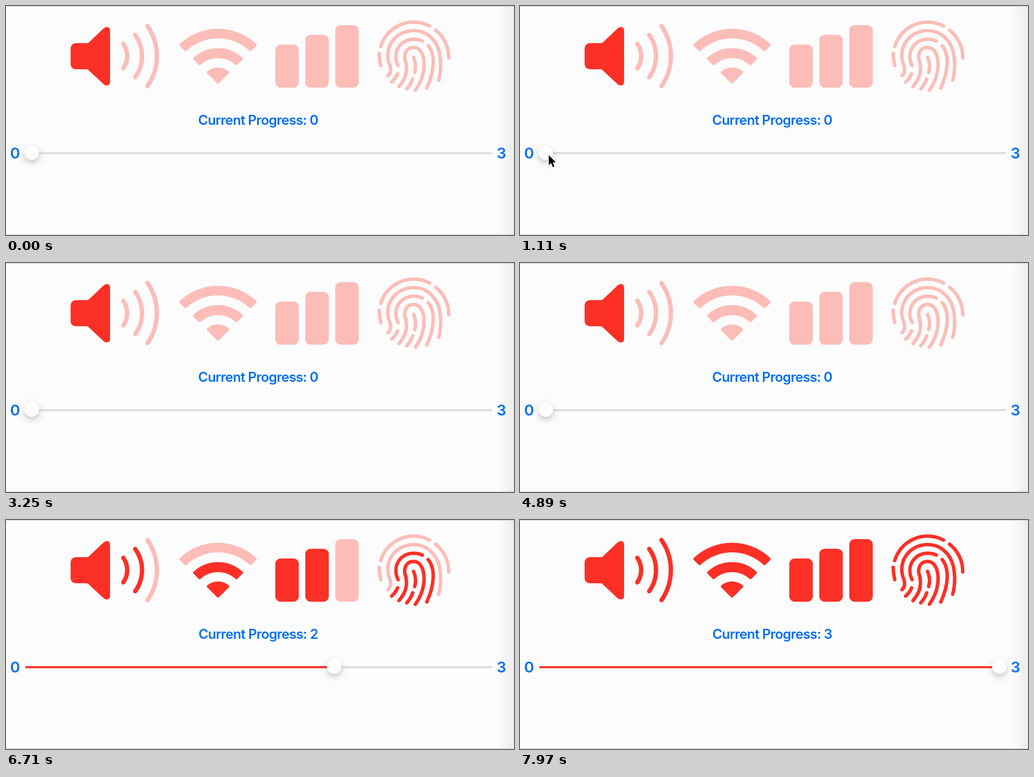
An HTML page with a canvas that plays this animation: 1113x503 px, repeating every 7.99 s.

```html
<!DOCTYPE html>
<html lang="en">
<head>
<meta charset="utf-8">
<title>Variable symbols</title>
<style>
  html, body { margin: 0; width: 100%; height: 100%; overflow: hidden; background: #fcfcfc; }
  canvas { display: block; }
</style>
</head>
<body>
<canvas id="stage" width="1113" height="503"></canvas>
<script>
const ctx = document.getElementById('stage').getContext('2d');
const W = 1113, H = 503, LOOP = 7990;
const RED = '#fd3026', PINK = '#fcbdb8', BLUE = '#016ff5';
const STEPS = [4910, 6010, 6790];
const CURSOR = { from: 850, to: 1900 };

const speaker = new Path2D(`M155 81.5H177Q180 81.5 182 79.5L213 50C219 44 228 45 228 54
  V167C228 175 219 177 213 171L182 142Q180 139 177 139H155Q141.5 139 141.5 126V95Q141.5 81.5 155 81.5Z`);

const waves = [
  'M257 83A47 47 0 0 1 257 137',
  'M283 63.5A79.6 79.6 0 0 1 283 156.5',
  'M310 44A116.5 116.5 0 0 1 310 176'
].map(d => new Path2D(d));

// Ridges grouped from the core outwards
const ridges = [
  `M861 177C876 159 880 145 876 124C869 107 877 91 893 91C910 91 916 112 916 128C916 150 909 168 897 185
   M893 113Q900 129 895.5 146M891 160Q887 172 878 182`,
  `M859 131C845 101 864 73 893 73Q904 73 912 77M925 87C942 108 938 145 922 180M845 167Q854 159 858 149`,
  `M821 89A75 75 0 0 1 928 44M941 53A76 76 0 0 1 970 114M817.5 104Q818 118 821 131
   M837 153C846 145 842 132 839 125C828 88 855 54 893 54C924 54 943 77 949 100C954 122 953 146 948 163`
].map(d => new Path2D(d));

const arrow = new Path2D('M0 0V22L5 17.5L9 26.5L12.5 25L8.8 16H15.5Z');

// Wi-Fi band between two radii, with softened corners
function band(inner, outer) {
  const x = 464.5, y = 171.5, soft = 3, up = -Math.PI / 2, half = Math.PI / 4;
  const p = new Path2D();
  const ro = outer - soft, ao = half - Math.asin(soft / ro);
  p.arc(x, y, ro, up - ao, up + ao);
  if (inner) {
    const ri = inner + soft, ai = half - Math.asin(soft / ri);
    p.arc(x, y, ri, up + ai, up - ai, true);
  } else {
    p.lineTo(x, y - soft * Math.SQRT2);
  }
  p.closePath();
  return p;
}
const bands = [band(0, 36.5), band(57, 79), band(100.5, 121.5)];

function stroke(path, color, width) {
  ctx.strokeStyle = color;
  ctx.lineWidth = width;
  ctx.stroke(path);
}

function pill(x, y, w, h, r, color) {
  ctx.fillStyle = color;
  ctx.beginPath();
  ctx.roundRect(x, y, w, h, r);
  ctx.fill();
}

function label(text, x, y, size, spacing = 0) {
  ctx.font = `600 ${size}px Inter, sans-serif`;
  ctx.letterSpacing = spacing + 'px';
  ctx.textAlign = 'center';
  ctx.fillStyle = BLUE;
  ctx.fillText(text, x, y);
}

function background() {
  ctx.fillStyle = '#fcfcfc';
  ctx.fillRect(0, 0, W, H);
  const edge = ctx.createLinearGradient(1080, 0, W, 0);
  edge.addColorStop(0, 'rgba(235,235,237,0)');
  edge.addColorStop(1, 'rgba(235,235,237,1)');
  ctx.fillStyle = edge;
  ctx.fillRect(1080, 0, W - 1080, H);
  ctx.fillStyle = '#c3c2ca';
  ctx.fillRect(0, 0, W, 1);
  ctx.fillRect(0, H - 1, W, 1);
}

function symbols(level) {
  ctx.fillStyle = RED;
  ctx.fill(speaker);
  for (let i = 0; i < 3; i++) {
    const color = i < level ? RED : PINK;
    stroke(waves[i], color, 9.5);
    ctx.fillStyle = color;
    ctx.fill(bands[i]);
    stroke(bands[i], color, 6);
    const top = 84.5 - 21.2 * i;
    pill(590 + 65.7 * i, top, 51.5, 179.5 - top, 12, color);
    stroke(ridges[i], color, 7.6);
  }
}

function slider(level) {
  const x = 56.5 + 331.3 * level;
  pill(42, 321, 1023, 4.4, 2.2, '#dddce1');
  if (level) pill(42, 321, x - 42, 4.4, 2.2, RED);
  ctx.save();
  ctx.shadowColor = 'rgba(0,0,0,0.22)';
  ctx.shadowBlur = 14;
  ctx.shadowOffsetY = 6;
  ctx.fillStyle = '#fefefe';
  ctx.beginPath();
  ctx.arc(x, 322, 16, 0, 2 * Math.PI);
  ctx.fill();
  ctx.restore();
  label('0', 20, 335, 33);
  label('3', 1085.5, 335, 33);
}

function cursor() {
  ctx.save();
  ctx.translate(63, 327.5);
  stroke(arrow, '#fff', 3);
  ctx.fillStyle = '#000';
  ctx.fill(arrow);
  ctx.restore();
}

function draw(t) {
  const level = STEPS.filter(s => t >= s).length;
  ctx.lineCap = ctx.lineJoin = 'round';
  background();
  symbols(level);
  label('Current Progress: ' + level, 552.5, 261, 29.5, -0.9);
  slider(level);
  if (t >= CURSOR.from && t < CURSOR.to) cursor();
}

const start = performance.now();
function frame() {
  draw((performance.now() - start) % LOOP);
  requestAnimationFrame(frame);
}
frame();
</script>
</body>
</html>
```
